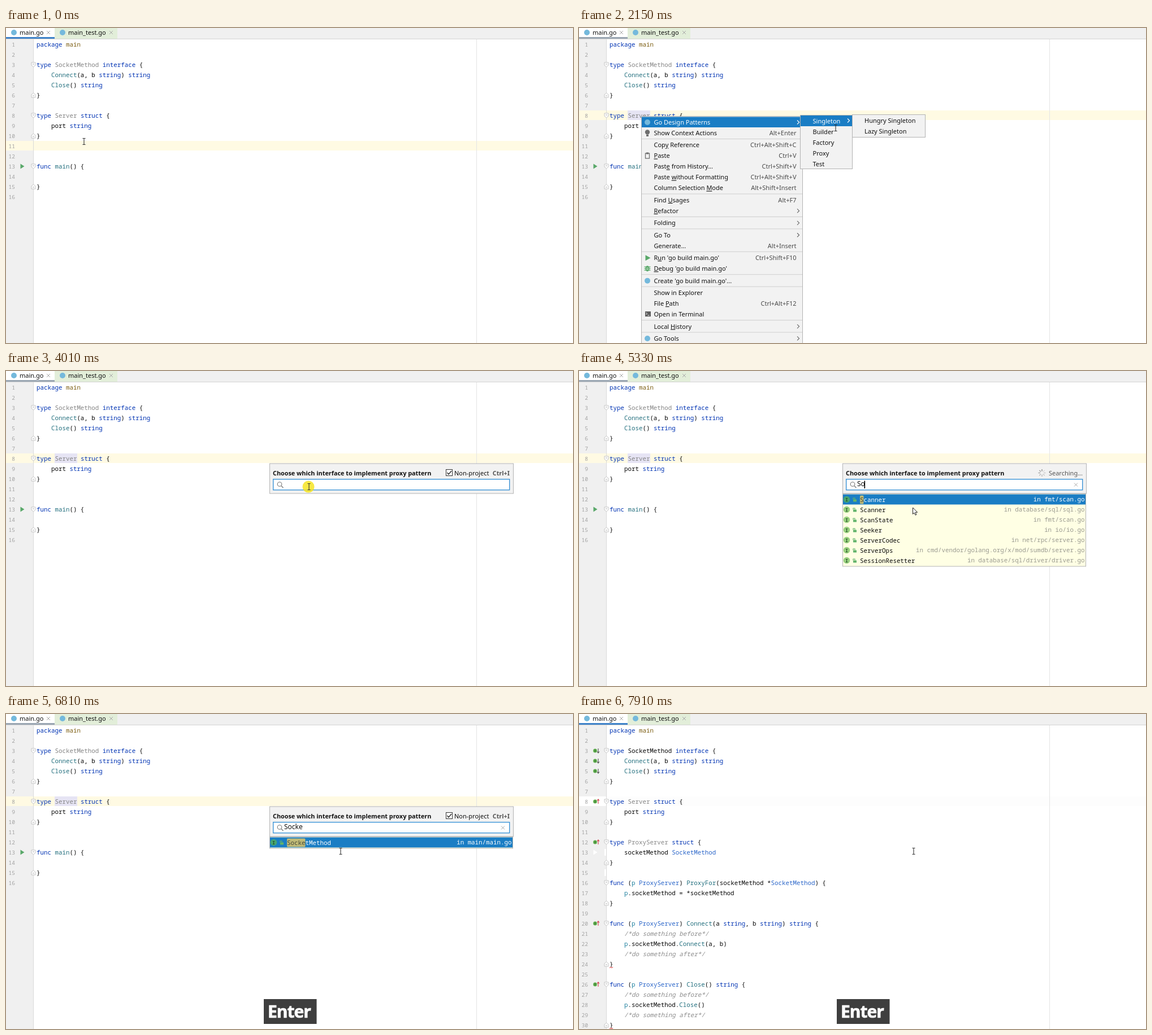
An HTML page that plays this animation: 1003x558 px, repeating every 8 s.

```html
<!DOCTYPE html>
<html lang="en">
<head>
<meta charset="utf-8">
<title>Proxy pattern generator</title>
<style>
html, body { margin: 0; width: 100%; height: 100%; overflow: hidden; background: #fff; }
svg { display: block; }
text { font: 11px "Noto Sans", "Open Sans", sans-serif; fill: #111; white-space: pre; }
.m { font: 10.82px "Noto Sans Mono", "DejaVu Sans Mono", monospace; fill: #080808; }
.b { font-weight: bold; font-size: 10.85px; }
.e { text-anchor: end; }
.num { font-size: 9.6px; fill: #a3a3a3; text-anchor: end; }
.short { fill: #4a4a4a; text-anchor: end; }
.u { text-decoration: underline; }
.w { fill: #fff; }
.press { font-size: 30px; font-weight: 800; letter-spacing: -1px; stroke: #fff; stroke-width: .7px; }
.key { fill: #0033b3; } .fn { fill: #24707f; } .def { fill: #858585; } .pkg { fill: #7d5f14; }
.ref { fill: #2b66c9; } .rcv { fill: #1c7f9e; } .com { fill: #8c8c8c; font-style: italic; }
</style>
</head>
<body>
<svg id="stage" width="1003" height="558" viewBox="0 0 1003 558"></svg>
<script>
const LOOP = 8000, BLUE = '#1a7dc4', GREEN = '#59a869', GOPHER = '#74b9dc';
const stage = document.getElementById('stage');

const text = (x, y, s, cls = '', more = '') => `<text x="${x}" y="${y}" class="${cls}" ${more}>${s}</text>`;
const rect = (x, y, w, h, fill, more = '') => `<rect x="${x}" y="${y}" width="${w}" height="${h}" fill="${fill}" ${more}/>`;
const line = (d, stroke, width = 1, more = '') => `<path d="${d}" fill="none" stroke="${stroke}" stroke-width="${width}" ${more}/>`;
const shape = (d, fill, more = '') => `<path d="${d}" fill="${fill}" ${more}/>`;
const dot = (x, y, r, fill, more = '') => `<circle cx="${x}" cy="${y}" r="${r}" fill="${fill}" ${more}/>`;
const cross = (x, y) => line(`M${x - 3} ${y - 3}l6 6m0 -6l-6 6`, '#a9a9a9');
const chevron = (x, y, c) => line(`M${x - 2} ${y - 3.5}l3.5 3.5l-3.5 3.5`, c, 1.1);
const panel = (x, y, w, h) => rect(x + .5, y + .5, w, h, '#f2f2f2', 'stroke="#b3b3b3"');
const rowY = n => 11 + 18 * n;

const head = `package main

type SocketMethod interface {
    Connect(a, b string) string
    Close() string
}

type Server struct {
    port string
}

`;
const before = (head + `
func main() {

}
`).split('\n');
const after = (head + `type ProxyServer struct {
    socketMethod SocketMethod
}

func (p ProxyServer) ProxyFor(socketMethod *SocketMethod) {
    p.socketMethod = *socketMethod
}

func (p ProxyServer) Connect(a string, b string) string {
    /*do something before*/
    p.socketMethod.Connect(a, b)
    /*do something after*/
}

func (p ProxyServer) Close() string {
    /*do something before*/
    p.socketMethod.Close()
    /*do something after*/
}`).split('\n');

const syntax = /(?<com>\/\*.*\*\/)|(?<pkg>(?<=package )\w+)|(?<def>(?<=type )\w+)|(?<key>\b(?:package|type|interface|struct|func|string)\b)|(?<fn>\w+(?=\())|(?<ref>\b(?:SocketMethod|ProxyServer)\b)|(?<rcv>\bp\b)/g;
const paint = (s, linked) => s.replace(syntax, (m, ...rest) => {
  const groups = rest.at(-1);
  const kind = Object.keys(groups).find(k => groups[k]);
  return linked && kind == 'def' && m == 'SocketMethod' ? m : `<tspan class="${kind}">${m}</tspan>`;
});

function fold(y, dir) {
  return shape(`M45 ${y - 4 * dir}h7v${5 * dir}l-3.5 ${3 * dir}l-3.5 ${-3 * dir}z`, '#fff', 'stroke="#c4c4c4"') + line(`M47 ${y - dir}h3`, '#b0b0b0');
}

function tabs(focused) {
  return rect(0, 0, 1003, 19, '#f0f0f0') + rect(0, 0, 86, 19, '#fff') + rect(86, 0, 111, 19, '#e2eed9') +
    rect(0, 19, 1003, 1, '#d4d4d4') + rect(0, 16, 86, 3, focused ? '#3f83c9' : '#9aa6b2') +
    dot(14, 8, 5, GOPHER) + text(24, 12, 'main.go') + cross(75, 8) +
    dot(100, 8, 5, GOPHER) + text(110, 12, 'main_test.go') + cross(186, 8);
}

function editor(t) {
  const done = t >= 7450, linked = t >= 7640, faded = t >= 7730;
  const top = 2 + 18 * (t < 990 ? 11 : 8), lines = done ? after : before;
  let s = rect(0, 20, 48, 538, '#f0f0f0');
  s += faded ? rect(0, top, 48, 17, '#fff') + rect(49, top, 954, 17, '#fdfdfd') : rect(0, top, 1003, 17, '#fffae3');
  s += rect(48, 20, 1, 538, '#d9d9d9') + rect(832, 20, 1, 538, '#e4e4e4');
  if (t >= 1390 && t < 7450) s += rect(86, 146, 40, 17, '#e6e4f4');
  lines.forEach((code, i) => {
    const y = rowY(i + 1);
    s += text(16, y + 4, i + 1, 'm num') + text(54, y + 4, paint(code, linked), 'm');
    if (/^\S.*\{$/.test(code)) s += fold(y, 1);
    if (code == '}') s += fold(y, -1);
  });
  s += shape('M25.500 240.500l7 4.500l-7 4.500z', done ? '#fff' : GREEN);
  if (done) s += rect(45, 239, 3, 12, '#fff') + rect(45, 275, 3, 12, '#fff') +
    [24, 30].map(n => line(`M54 ${rowY(n) + 7}l2 -2l2 2l2 -2`, '#e03030')).join('');
  if (linked) for (const n of [3, 4, 5, 8, 12, 20, 26]) {
    const y = rowY(n), down = n < 6;
    s += dot(28.5, y, 3.5, '#62b152') + rect(28, y - 2, 1, 4, '#285b20') +
      line(down ? `M34 ${y - 4}v8m-2 -2.500l2 2.500l2 -2.500` : `M34 ${y + 4}v-8m-2 2.500l2 -2.500l2 2.500`, down ? '#555' : '#d2404c', 1.1);
  }
  if (t >= 380 && t < 910) s += rect(54, 201, 1, 15, '#000');
  return s;
}

// '-' starts a group, '_' marks the underlined letter, '>' opens a submenu
const menuItems = ['Go Design Patterns|>', 'Show Context Actions|Alt+Enter', '-', 'Cop_y Reference|Ctrl+Alt+Shift+C',
  '_Paste|Ctrl+V', 'Past_e from History...|Ctrl+Shift+V', 'Paste _without Formatting|Ctrl+Alt+Shift+V',
  'Column Selection _Mode|Alt+Shift+Insert', '-', 'Find _Usages|Alt+F7', '_Refactor|>', '-', 'Folding|>', '-', 'Go To|>',
  'Generate...|Alt+Insert', '-', "R_un 'go build main.go'|Ctrl+Shift+F10", "_Debug 'go build main.go'|", '-',
  "Create 'go build main.go'...|", '-', 'Show in Explorer|', 'File _Path|Ctrl+Alt+F12', 'Open in Terminal|', '-',
  'Local _History|>', '-', 'Go Tools|>'];

function menuIcon(name, y) {
  if (/^(Go D|Create|Go Tools)/.test(name)) return dot(121, y, 5, GOPHER);
  if (/^Show C/.test(name)) return dot(121, y - 1.5, 4.2, '#6e6e6e') + rect(119, y + 3, 4, 3, '#6e6e6e');
  if (name == '_Paste') return rect(117.5, y - 4.5, 7, 9, 'none', 'stroke="#6e6e6e" stroke-width="1.3"') + rect(119, y - 6, 4, 3, '#6e6e6e');
  if (/^R_un/.test(name)) return shape(`M117.500 ${y - 5}l9 5l-9 5z`, GREEN);
  if (/^_Debug/.test(name)) return `<ellipse cx="121" cy="${y}" rx="3.500" ry="5" fill="${GREEN}"/>` +
    line(`M115.500 ${y - 3}h11m-11 3h11m-11 3h11`, GREEN, 1.3) + line(`M119 ${y - 1}h4m-4 2.500h4`, '#f2f2f2', .8);
  if (/Terminal/.test(name)) return rect(117, y - 5, 10, 9, '#5d5d5d') + line(`M118.500 ${y - 3}l2 2l-2 2m3 1h3`, '#fff');
  return '';
}

function menu(t) {
  const active = t >= 1466;
  let y = 167, s = panel(110, 156, 285, 410);
  if (active) s += rect(111, 157.5, 281, 18.5, BLUE);
  menuItems.forEach((item, i) => {
    if (item == '-') {
      s += rect(111, y - 9, 284, 1, '#cfcfcf');
      y += 2.44;
      return;
    }
    const [name, key] = item.split('|'), cls = active && !i ? 'w' : '';
    s += menuIcon(name, y) + text(132.5, y + 4, name.replace(/_(.)/, '<tspan class="u">$1</tspan>'), cls);
    s += key == '>' ? chevron(388, y, cls ? '#fff' : '#666') : text(384.5, y + 4, key, 'short');
    y += 19;
  });
  return s;
}

function submenu(t, x, y) {
  const picked = x < 392 ? -1 : t < 2380 ? 0 : Math.floor((y - 155) / 19);
  let s = panel(391, 154, 92, 95);
  if (picked >= 0) s += rect(392, 155 + 19 * picked, 91, 19, BLUE);
  ['Singleton', 'Builder', 'Factory', 'Proxy', 'Test'].forEach((name, i) => {
    s += text(413.5, 168.5 + 19 * i, name, i == picked ? 'w' : '');
  });
  s += chevron(477, 164, picked ? '#666' : '#fff');
  if (t >= 2070 && t < 2460) s += panel(483, 153, 129, 40) + text(505, 168, 'Hungry Singleton') + text(505, 187, 'Lazy Singleton');
  return s;
}

const target = 'SocketMethod|main/main.go';
const found = ['Scanner|fmt/scan.go', 'Scanner|database/sql/sql.go', 'ScanState|fmt/scan.go', 'Seeker|io/io.go',
  'ServerCodec|net/rpc/server.go', 'ServerOps|cmd/vendor/golang.org/x/mod/sumdb/server.go',
  'SessionResetter|database/sql/driver/driver.go', 'State|fmt/print.go', 'Stringer|fmt/print.go', 'StringWriter|io/io.go'];

function results(t, typed) {
  const wide = t >= 5480 && t < 6360, right = wide ? 926 : 896;
  const rows = t < 5480 ? found.slice(0, 7) : [target, ...found].slice(0, t < 5710 ? 11 : t < 6360 ? 6 : 1);
  const marked = t < 5480 ? 1 : typed.length;
  let s = rect(466.5, 217.5, right - 466, 18 * rows.length + 2.5, '#ffffe4', 'stroke="#b3b3b3"') + rect(467, 218.5, right - 467, 18, BLUE);
  rows.forEach((row, i) => {
    const [name, file] = row.split('|'), y = 227.5 + 18 * i, cls = i ? 'm' : 'm w';
    s += dot(473.5, y, 5.8, i ? '#97cf7e' : '#45a573') + text(473.5, y + 3, 'I', 'm', 'text-anchor="middle" style="font-size:8.5px;font-weight:bold;fill:#27552a"') +
      rect(485, y, 6, 4, '#62b36a') + line(`M485 ${y}v-2.500h3v2.500`, '#62b36a', 1.2);
    if (!i) s += rect(497, y - 7, 6.49 * marked, 15, '#c0ba76', 'rx="1.500"');
    s += text(497, y + 4, i ? name : `<tspan fill="#454a3c">${name.slice(0, marked)}</tspan>${name.slice(marked)}`, cls) +
      text(right - 1.5, y + 3, 'in ' + file, cls + ' e', i ? 'style="fill:#9a9a90"' : '');
  });
  return s;
}

function spinner(t) {
  let s = '';
  for (let i = 0; i < 8; i++) {
    const shade = (i + 8 - Math.floor(t / 130) % 8) % 8;
    s += `<path d="M819 177.500v-3.500" stroke="#777" stroke-width="1.300" opacity="${.25 + shade * .09}" transform="rotate(${i * 45} 819 180.500)"/>`;
  }
  return s;
}

function chooser(t) {
  const typed = 'Socke'.slice(0, [4710, 5210, 5710, 5880, 6360].filter(k => t >= k).length);
  let s = panel(466, 163.5, 431, 53) + text(472, 184.5, 'Choose which interface to implement proxy pattern', 'b');
  if (t >= 4860 && t < 5480) s += spinner(t) + text(891, 184.5, 'Searching...', 'e', 'style="fill:#555"');
  else s += rect(778.5, 174.5, 11, 11, '#fff', 'stroke="#333"') + line('M780.500 180l2.500 3l5 -6', '#222', 1.4) +
    text(793, 184.5, 'Non-project') + text(891, 184.5, 'Ctrl+I', 'b e', 'style="fill:#555"');
  s += rect(472.7, 191.7, 418, 19, '#fff', 'stroke="#3d94d6" stroke-width="1.400"') +
    dot(484, 200.5, 3.8, 'none', 'stroke="#777" stroke-width="1.100"') + line('M487 203.500l3.500 3.500', '#777', 1.2);
  if (typed) {
    s += text(492, 204, typed, '', 'style="font-size:12px"') + cross(879, 201.5);
    if (t < 6810) s += rect(492 + [0, 6.6, 12.5, 19.5, 26, 33][typed.length], 194.5, 1.6, 13.5, '#000');
  }
  return s + (t >= 4860 ? results(t, typed) : '');
}

// time, x, y; the pointer advances in short hops between the points
const route = [[0, 138, 201], [74, 138, 201], [910, 112, 160], [990, 112, 158], [1314, 112, 158], [1700, 250, 167], [1990, 405, 166],
  [2150, 454, 177], [2230, 454, 189], [2380, 454, 189], [3150, 458, 220], [3474, 458, 220], [3780, 536, 205],
  [4174, 536, 205], [4480, 592, 243], [LOOP, 592, 243]];

function pointerAt(t) {
  const i = route.findIndex(p => p[0] > t), [t0, x0, y0] = route[i - 1], [t1, x1, y1] = route[i];
  const k = Math.floor((t - t0) / 76) * 76 / (t1 - t0);
  return [x0 + (x1 - x0) * k, y0 + (y1 - y0) * k];
}

function pointer(t, x, y) {
  const arrow = t >= 1220 && t < 1390 || t >= 4860 && t < 6360;
  if (arrow) return shape(`M${x - 1.5} ${y - 1}v11.500l2.600 -2.400l1.900 4.200l1.900 -.900l-1.900 -4.100h3.600z`, '#fff', 'stroke="#222" stroke-width="1"');
  return line(`M${x - 2.5} ${y - 5.5}h2l.5 .5l.5 -.5h2m-2.500 .5v10m-2.500 .5h2l.5 -.5l.5 .5h2`, '#333', 1.1);
}

function scene(t) {
  const [x, y] = pointerAt(t), focused = t < 1220 || t >= 7360;
  let s = editor(t) + tabs(focused);
  if (t >= 1220 && t < 3250) s += menu(t);
  if (t >= 1770 && t < 3250) s += submenu(t, x, y);
  if (t >= 3320 && t < 7360) s += chooser(t);
  if (t >= 4010 && t < 4080) s += dot(535, 205, 10.5, '#f5e31c', 'opacity=".82"');
  s += pointer(t, x, y);
  if (t >= 6810) s += rect(456, 505, 93.5, 44, '#3e3e3e') + text(463, 538, 'Enter', 'w press');
  return s;
}

let shown = '';
const start = performance.now();
function tick() {
  const next = scene((performance.now() - start) % LOOP);
  if (next != shown) stage.innerHTML = shown = next;
  requestAnimationFrame(tick);
}
tick();
</script>
</body>
</html>
```
